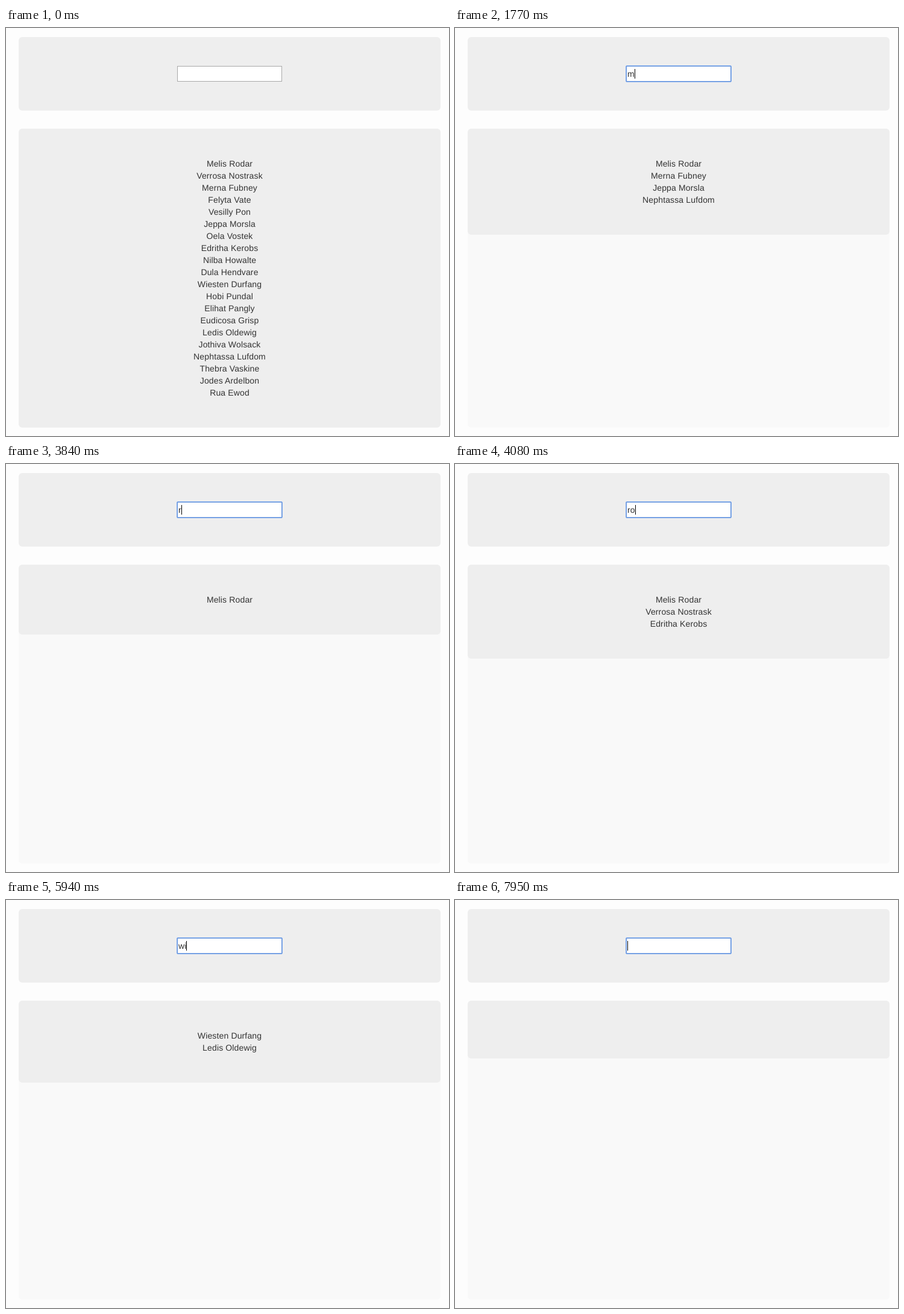
These frames come from a looping animation (735x677 px, 8000 ms). An HTML page:

```html
<!DOCTYPE html>
<html lang="en">
<head>
<meta charset="utf-8">
<title>Live list filter</title>
<style>
  html, body { margin: 0; width: 100%; height: 100%; overflow: hidden; background: #fdfdfd; }
  svg { display: block; width: 735px; height: 677px; }
  text {
    font: 14px "Liberation Sans", Arial, sans-serif;
    letter-spacing: .14px;
    text-rendering: geometricPrecision;
    fill: #333;
  }
  #rows text { text-anchor: middle; }
  .panel { fill: #eee; }
</style>
</head>
<body>
<svg viewBox="0 0 735 677">
  <rect width="735" height="677" fill="#fdfdfd"/>
  <rect class="panel" x="21" y="15" width="700" height="122" rx="6"/>
  <rect x="21" y="167" width="700" height="496" rx="6" fill="#f9f9f9"/>
  <rect id="panel" class="panel" x="21" y="167" width="700" height="496" rx="6"/>
  <rect x="284.5" y="63.5" width="173" height="25" fill="#fff" stroke="#a9a9a9"/>
  <g id="ring" fill="none">
    <rect x="283.5" y="62.5" width="175" height="27" rx="1.5" stroke="#85aeee"/>
    <rect x="284.5" y="63.5" width="173" height="25" stroke="#6895da"/>
  </g>
  <rect id="mark" x="286" y="68" height="16" fill="#3399ff"/>
  <text id="field" x="286" y="81"></text>
  <rect id="caret" y="68" width="1" height="16" fill="#000"/>
  <g id="rows"></g>
</svg>
<script>
const LOOP = 8000;
const people = [
  'Melis Rodar', 'Verrosa Nostrask', 'Merna Fubney', 'Felyta Vate', 'Vesilly Pon',
  'Jeppa Morsla', 'Oela Vostek', 'Edritha Kerobs', 'Nilba Howalte', 'Dula Hendvare',
  'Wiesten Durfang', 'Hobi Pundal', 'Elihat Pangly', 'Eudicosa Grisp', 'Ledis Oldewig',
  'Jothiva Wolsack', 'Nephtassa Lufdom', 'Thebra Vaskine', 'Jodes Ardelbon', 'Rua Ewod'
];

// Time, what happens, and its text
const events = [
  [0, 'blur'], [750, 'type', ''], [1290, 'blink'],
  [1710, 'type', 'm'], [1770, 'filter'], [1800, 'type', 'me'], [1860, 'filter'],
  [1950, 'type', 'mel'], [2070, 'filter'], [2160, 'type', 'meli'],
  [2670, 'type', 'melis'], [3240, 'blink'], [3420, 'select'],
  [3840, 'type', 'r'], [3990, 'filter'], [4050, 'type', 'ro'], [4080, 'filter'],
  [4290, 'type', 'rod'], [4350, 'filter'], [4410, 'type', 'roda'], [4470, 'type', 'rodar'],
  [4950, 'select'], [5100, 'type', ''], [5220, 'filter'],
  [5730, 'type', 'w'], [5790, 'filter'], [5910, 'type', 'wi'], [5940, 'filter'],
  [6090, 'type', 'wie'], [6150, 'filter'], [6300, 'type', 'wies'],
  [6720, 'type', 'wiest'], [7260, 'blink'], [7410, 'type', 'wieste'],
  [7560, 'type', 'wiesten'], [7650, 'type', 'wiesteni'], [7710, 'filter'],
  [7800, 'select'], [7950, 'type', '']
];

const $ = id => document.getElementById(id);
const show = (el, on) => el.setAttribute('visibility', on ? 'visible' : 'hidden');

const rows = people.map(name => {
  const row = document.createElementNS('http://www.w3.org/2000/svg', 'text');
  row.textContent = name;
  row.setAttribute('x', 371);
  $('rows').append(row);
  return row;
});

function stateAt(time) {
  const s = { text: '', query: '', focus: false, caret: false, selected: false };
  for (const [start, kind, text] of events) {
    if (start > time) break;
    if (kind === 'filter') s.query = s.text;
    if (kind === 'type') Object.assign(s, { text, focus: true, caret: true, selected: false });
    if (kind === 'blink') s.caret = false;
    if (kind === 'select') Object.assign(s, { caret: false, selected: true });
  }
  return s;
}

function render(time) {
  const s = stateAt(time);
  $('field').textContent = s.text;
  $('field').style.fill = s.selected ? '#fff' : '#333';
  const width = s.text ? Math.round($('field').getComputedTextLength() - .14) : 0;
  $('caret').setAttribute('x', 286 + width);
  $('mark').setAttribute('width', width);
  show($('ring'), s.focus);
  show($('caret'), s.caret);
  show($('mark'), s.selected);

  let count = 0;
  rows.forEach((row, i) => {
    const hit = people[i].toLowerCase().includes(s.query);
    show(row, hit);
    if (hit) row.setAttribute('y', 230 + 20 * count++);
  });
  $('panel').setAttribute('height', 96 + 20 * count);
}

const begin = performance.now();
function tick() {
  render((performance.now() - begin) % LOOP);
  requestAnimationFrame(tick);
}
tick();
</script>
</body>
</html>
```
